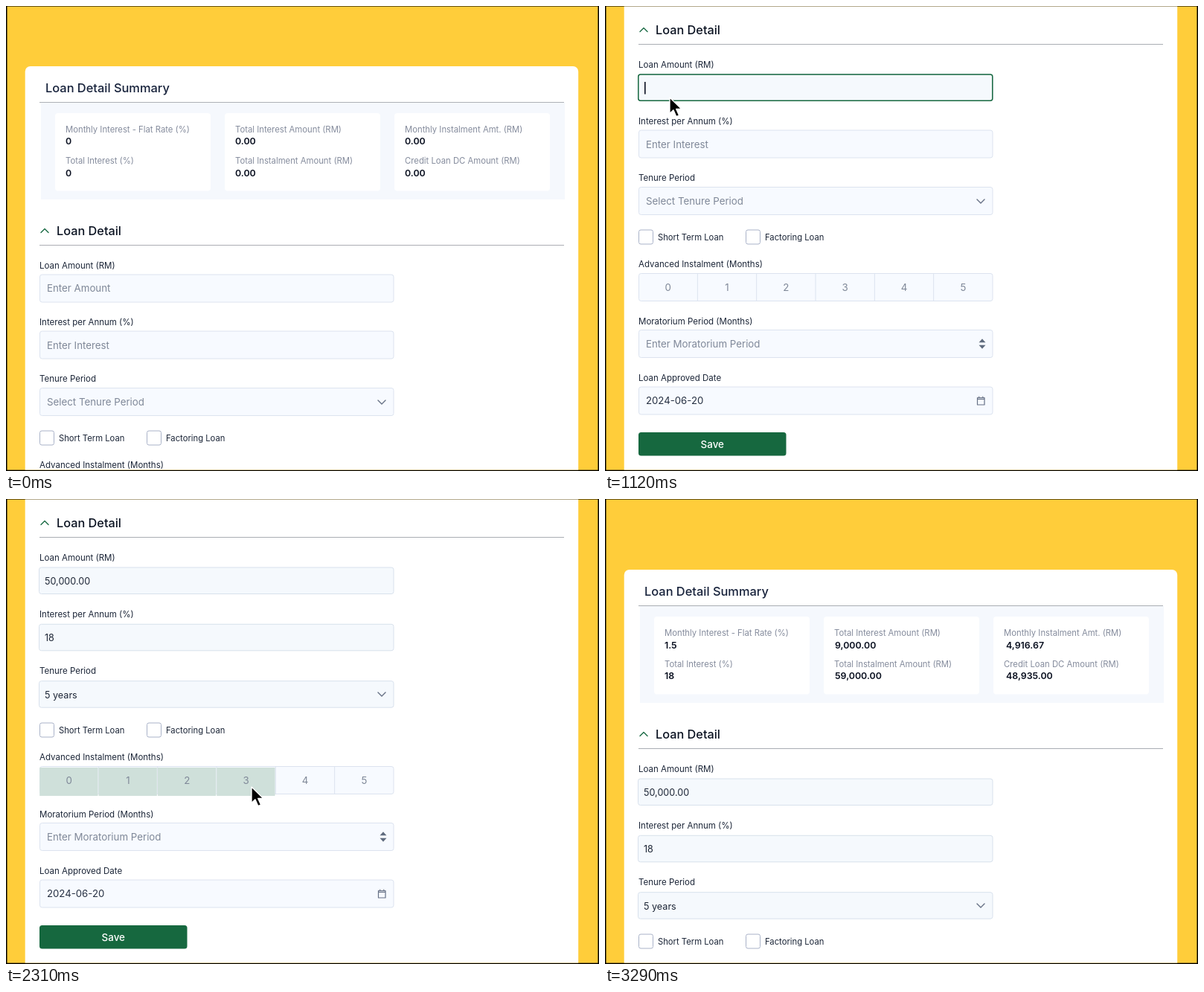
Animation, 797 px wide and 625 px high, one loop 3.5 s. Source, as an HTML page:

```html
<!DOCTYPE html>
<html lang="en">
<head>
<meta charset="utf-8">
<title>Loan calculator</title>
<style>
  html, body { margin: 0; width: 100%; height: 100%; overflow: hidden; background: #000; }
  svg { display: block; width: 797px; height: 625px; font-family: Inter, "Open Sans", sans-serif; }
  text { white-space: pre; }
  .title { font-size: 16.4px; font-weight: 500; fill: #17223b; }
  .head { font-size: 16.3px; font-weight: 500; fill: #0b1322; }
  .label { font-size: 11.5px; fill: #1c2638; }
  .check { font-size: 11.25px; fill: #1c2638; }
  .note { font-size: 11.3px; fill: #858c9d; }
  .value { font-size: 12.4px; font-weight: 600; fill: #0a1020; }
  .hint { font-size: 13.3px; fill: #7f8898; }
  .date { font-size: 13.2px; fill: #273143; }
  .typed { font-size: 12.6px; fill: #1d2636; }
  .save { font-size: 13.4px; font-weight: 500; fill: #fff; }
  .mid { text-anchor: middle; }
  .box { fill: #f7faff; stroke: #dce3ef; }
  .filled { fill: #f5f9fd; stroke: #d8e1ec; }
  .tick { fill: #fff; stroke: #a9b2c8; }
  .rule { fill: #a9adb3; }
  .icon { fill: none; stroke: #667085; stroke-width: 1.4; stroke-linecap: round; stroke-linejoin: round; }
</style>
</head>
<body>
<svg id="stage" viewBox="0 0 797 625"></svg>
<script>
const LOOP = 3500, STEP = 70, LAST = 3290;
const GREEN = '#16683f', CELL = 476 / 6;
const months = [0, 1, 2, 3, 4, 5];

// Text is placed by its left edge and the middle of its capitals.
const text = (x, y, cls, str, id = '') =>
  `<text x="${x}" y="${y}" dy=".364em" class="${cls}" ${id && `id="${id}"`}>${str}</text>`;
const rect = (x, y, w, h, attrs) =>
  `<rect x="${x}" y="${y}" width="${w}" height="${h}" ${attrs}/>`;
const box = y => rect(45.5, y, 475.5, 37, 'rx="3" class="box"');
const filled = y => rect(44.5, y, 476.5, 35.5, 'rx="3" class="filled"');
const group = (id, ...parts) => `<g id="${id}">${parts.join('')}</g>`;
const cellX = i => 45 + CELL * i;

const columns = [
  [66, 'Monthly Interest - Flat Rate (%)', 'Total Interest (%)', '0', '1.5', '18', 0],
  [294, 'Total Interest Amount (RM)', 'Total Instalment Amount (RM)', '0.00', '9,000.00', '59,000.00', 1],
  [522, 'Monthly Instalment Amt. (RM)', 'Credit Loan DC Amount (RM)', '0.00', '4,916.67', '48,935.00', 3],
];

const summary = [
  text(53, 110, 'title', 'Loan Detail Summary'),
  rect(45, 129, 705, 1, 'class="rule"'),
  rect(47, 130, 704, 130, 'fill="#f5f8fd"'),
  ...columns.map(([x, a, b]) =>
    rect(x, 144, 209, 104.5, 'rx="4" fill="#fff"') +
    text(x + 14, 165.5, 'note', a) + text(x + 14, 208, 'note', b)),
  group('zeros', ...columns.map(c =>
    text(c[0] + 14, 181.5, 'value', c[3]) + text(c[0] + 14, 224, 'value', c[3]))),
  group('results', ...columns.map(c =>
    text(c[0] + 14 + c[6], 182.5, 'value', c[4]) + text(c[0] + 14 + c[6], 223.5, 'value', c[5]))),
];

const form = [
  '<path d="M47 304.5l5-5 5 5" class="icon" style="stroke:#1b6b45"/>',
  text(68, 302, 'head', 'Loan Detail'),
  rect(45, 321, 705, 1, 'class="rule"'),
  ...[[348.5, 'Loan Amount (RM)'], [425, 'Interest per Annum (%)'], [501, 'Tenure Period'],
      [617, 'Advanced Instalment (Months)'], [693.5, 'Moratorium Period (Months)'],
      [769.5, 'Loan Approved Date']].map(([y, s]) => text(45, y, 'label', s)),

  group('amountEmpty', box(361), text(55, 379.5, 'hint', 'Enter Amount')),
  group('amountFilled', filled(362),
    rect(44.8, 362, 476, 35.2, `id="focus" rx="3" fill="none" stroke="${GREEN}" stroke-width="1.5"`),
    text(52, 380.2, 'typed', '', 'amount'),
    rect(0, 372, 1.6, 16.5, 'id="caret" fill="#0a1020"')),
  group('restEmpty',
    box(437), text(55, 455.7, 'hint', 'Enter Interest'),
    box(513.5), text(55, 532, 'hint', 'Select Tenure Period')),
  group('restFilled',
    filled(438.3), text(52, 456.8, 'typed', '18'),
    filled(514.7), text(52, 533.2, 'typed', '5 years')),
  '<path d="M500 530l5 5 5-5" class="icon"/>',

  ...[[45.5, 'Short Term Loan'], [189.5, 'Factoring Loan']].map(([x, s]) =>
    rect(x, 571, 19, 19, 'rx="2.5" class="tick"') + text(x + 25.5, 580.5, 'check', s)),

  rect(45.5, 629.5, 475.5, 37, 'rx="3" class="box"'),
  ...months.map(i =>
    (i ? rect(cellX(i) - .5, 630, 1, 36, 'fill="#dce3ef"') : '') +
    text(cellX(i + .5), 648, 'hint mid', i)),
  group('hover', ...months.slice(0, 4).map(i =>
    rect(cellX(i) + .2, 631, CELL - 1, 38, 'fill="#cfe0da"') +
    text(cellX(i + .5), 648, 'hint mid', i))),
  group('picked', ...months.slice(0, 4).map(i =>
    rect(cellX(i) - .6, 630.4, CELL, 39.6, 'fill="#e6efeb"') +
    rect(cellX(i) - .1, 631, CELL - 1, 38.5, `fill="${GREEN}"`) +
    text(cellX(i + .5) - .7, 650.2, 'hint mid', i).replace('<text', '<text style="fill:#fff"'))),

  box(705.5), text(55, 724, 'hint', 'Enter Moratorium Period'),
  '<path d="M502.5 722.3l4.5-5 4.5 5zM502.5 725.7l4.5 5 4.5-5z" fill="#5f6b7e"/>',
  box(782), text(55, 800.5, 'date', '2024-06-20'),
  '<path d="M500.5 796.5h9.5v9.5h-9.5zM500.5 798.4h9.5M502.7 795v1.5M507.8 795v1.5" class="icon" style="stroke-width:1.2"/>',
  rect(45, 843, 198.5, 31.5, `rx="3.5" fill="${GREEN}"`),
  text(144.3, 859, 'save mid', 'Save'),
];

const pointer = `<g id="pointer"><path d="M0 0V19.5l4.5-4.2 3.5 8 3.4-1.5-3.5-7.8h6.3z" transform="scale(1.1)"
  fill="#000" stroke="#fff" stroke-width="1.2" stroke-linejoin="round"/></g>`;

const stage = document.getElementById('stage');
stage.innerHTML =
  rect(1.5, .6, 794, 623, 'fill="#ffcd3a"') +
  `<clipPath id="clip">${rect(0, .6, 797, 622.9, '')}</clipPath>` +
  `<g clip-path="url(#clip)">` +
  group('page', rect(25.7, 81, 743.5, 900, 'rx="7" fill="#fff"'), ...summary, ...form, pointer) +
  '</g>';

const el = id => document.getElementById(id);
const show = (id, a) => el(id).setAttribute('opacity', a);
const move = (id, x, y) => el(id).setAttribute('transform', `translate(${x} ${y})`);
const ramp = (t, from, to) => Math.min(1, Math.max(0, (t - from) / (to - from)));

// Same curve as CSS ease-in-out.
function ease(x) {
  let lo = 0, hi = 1, s = .5;
  for (let i = 0; i < 24; i++) {
    s = (lo + hi) / 2;
    if (1.26 * s - .78 * s * s + .52 * s ** 3 < x) lo = s; else hi = s;
  }
  return 3 * s * s - 2 * s ** 3;
}

// Pointer stops in page space: start, end, x, y
const stops = [[490, 910, 87, 393], [1190, 1680, 125, 381], [1820, 2240, 330, 657]];
function pointerAt(t) {
  let x = 300, y = 900;
  for (const [from, to, nx, ny] of stops) {
    const p = ease(ramp(t, from, to));
    x += (nx - x) * p;
    y += (ny - y) * p;
  }
  return [x, y];
}

function draw(t) {
  const down = ease(ramp(t, -72, 389)), up = ease(ramp(t, 2588, 3049));
  move('page', 0, 14 - 284 * (down - up));
  move('pointer', ...pointerAt(t));
  show('pointer', t >= 490 ? 1 : 0);

  const active = t >= 980, focused = active && t < 1960;
  show('amountEmpty', active ? 0 : 1);
  show('amountFilled', active ? 1 : 0);
  show('focus', focused ? 1 : 0);
  show('caret', focused ? 1 : 0);
  const typed = '50,000.00'.slice(0, Math.round(9 * ramp(t, 1190, 1680)));
  el('amount').textContent = typed;
  el('caret').setAttribute('x', typed ? 56 + el('amount').getComputedTextLength() : 53);

  const rest = ramp(t, 1400, 1680);
  show('restEmpty', 1 - rest);
  show('restFilled', rest);

  show('hover', ramp(t, 2030, 2240));
  show('picked', ramp(t, 2380, 2520));
  show('zeros', t < 2450 ? 1 : 0);
  show('results', t < 2450 ? 0 : 1);
}

const begin = performance.now();
function tick() {
  const t = Math.max(0, performance.now() - begin) % LOOP;
  draw(Math.min(LAST, Math.floor(t / STEP) * STEP));
  requestAnimationFrame(tick);
}
tick();
</script>
</body>
</html>
```
